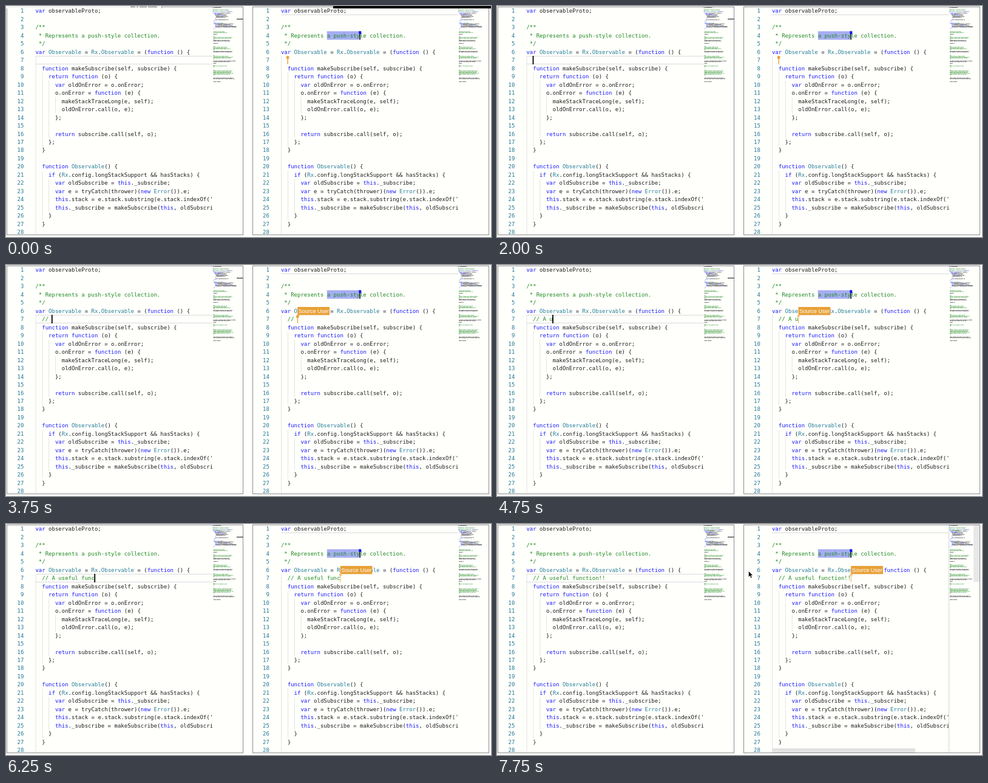
Animation, 799 px wide and 380 px high, one loop 8000 ms. Source, as an HTML page:

```html
<!DOCTYPE html>
<html lang="en">
<head>
<meta charset="utf-8">
<title>Shared code editing</title>
<style>
html, body { margin: 0; width: 100%; height: 100%; overflow: hidden; background: #fffffc; }
svg { display: block; }
text { white-space: pre; font: 9px "DejaVu Sans Mono", monospace; }
.tag { font: 9px "Liberation Sans", Arial, sans-serif; fill: #fff; }
</style>
</head>
<body>
<svg id="stage" width="799" height="380" viewBox="0 0 799 380"></svg>
<script>
const LOOP = 8000, CH = 5.418, LH = 13.48, TOP = 1.5, X0 = 48.4, SHIFT = 404.5;
const MINI_X = 340.5, MINI_CH = 0.7, MINI_LH = 1.35;
const PAPER = '#fffffc', INK = '#1c1c1c', GREEN = '#1f8a1f', BLUE = '#1a1aff', TEAL = '#267f99', ORANGE = '#e8a138';
const NOTE = '// A useful function!!';

const CODE = `var observableProto;

/**
 * Represents a push-style collection.
 */
var Observable = Rx.Observable = (function () {

  function makeSubscribe(self, subscribe) {
    return function (o) {
      var oldOnError = o.onError;
      o.onError = function (e) {
        makeStackTraceLong(e, self);
        oldOnError.call(o, e);
      };

      return subscribe.call(self, o);
    };
  }

  function Observable() {
    if (Rx.config.longStackSupport && hasStacks) {
      var oldSubscribe = this._subscribe;
      var e = tryCatch(thrower)(new Error()).e;
      this.stack = e.stack.substring(e.stack.indexOf('\\n') + 1);
      this._subscribe = makeSubscribe(this, oldSubscribe);
    }
  }
`.split('\n');

// [time, characters typed]
const KEYS = [[3250, 1], [3500, 2], [3750, 3], [4250, 4], [4500, 5], [4750, 6], [5000, 8], [5250, 9],
  [5500, 12], [5750, 13], [6000, 15], [6250, 16], [6500, 19], [6750, 20], [7000, 22]];

// indent guides: [column, first line, last line]
const GUIDES = [[0, 7, 28], [2, 9, 17], [2, 21, 26], [4, 10, 16], [4, 22, 25], [6, 12, 13]];

// rest of the minimap: [top, rows, width, colour]
const BLOCKS = [[42, 2, 28, GREEN], [46, 1, 9, INK], [50, 4, 36, GREEN], [56, 2, 34, INK], [61, 1, 12, INK],
  [66, 5, 30, GREEN], [74, 2, 33, INK], [81, 5, 35, GREEN], [90, 2, 39, INK], [94, 1, 8, INK],
  [97, 3, 26, GREEN], [105, 7, 34, GREEN], [118, 2, 39, INK], [124, 1, 14, INK]];

const svg = document.getElementById('stage');

function add(parent, name, attrs, text) {
  const el = document.createElementNS('http://www.w3.org/2000/svg', name);
  for (const k in attrs) el.setAttribute(k, attrs[k]);
  if (text !== undefined) el.textContent = text;
  parent.appendChild(el);
  return el;
}
const rect = (p, x, y, width, height, fill, more) => add(p, 'rect', { x, y, width, height, fill, ...more });
const show = (el, on) => el.setAttribute('visibility', on ? 'visible' : 'hidden');
const place = (el, x) => el.setAttribute('transform', `translate(${x} 0)`);
const lineTop = n => TOP + (n - 1) * LH;

function tokens(line) {
  if (/^\s*(\/\/|\/\*|\*)/.test(line)) return [[line, GREEN]];
  const parts = line.match(/\w+|\W+/g) || [];
  return parts.map(s => [s,
    /^(var|function|return|if|this|new)$/.test(s) ? BLUE :
    /^(Observable|Rx|Error)$/.test(s) ? TEAL : INK]);
}

function drawLine(g, line, n) {
  const t = add(g, 'text', { x: X0, y: lineTop(n) + 9.8 });
  for (const [s, fill] of tokens(line)) add(t, 'tspan', { fill }, s);
}

const miniBar = (g, x, y, width, fill) => rect(g, MINI_X + x, y, width, 0.9, fill, { opacity: 0.65 });

function drawMini(g, line, n) {
  let col = 0;
  for (const [s, fill] of tokens(line)) {
    for (const w of s.matchAll(/\S+/g)) {
      const x = (col + w.index) * MINI_CH;
      const width = Math.min(w[0].length * MINI_CH, 39 - x);
      if (width > 0) miniBar(g, x, 2 + (n - 1) * MINI_LH, width, fill);
    }
    col += s.length;
  }
}

function drawBlocks(g) {
  let seed = 7;
  const rnd = () => (seed = seed * 16807 % 2147483647) / 2147483647;
  for (const [top, rows, width, fill] of BLOCKS) {
    for (let r = 0; r < rows; r++) {
      const end = rows > 2 && (r === 0 || r === rows - 1) ? 3 : width * (0.7 + 0.3 * rnd());
      let x = 1;
      while (x < end) {
        const w = Math.min(1.5 + rnd() * 5, end - x);
        miniBar(g, x, top + r * MINI_LH, w, fill);
        x += w + 0.7;
      }
    }
  }
}

const defs = add(svg, 'defs', {});
rect(add(defs, 'clipPath', { id: 'code' }), 0, 0, 340.3, 376, '#000');

function editor(shift, activeLine, selected) {
  rect(svg, Math.round(shift) + 1.5, 1.5, 389, 375, PAPER, { stroke: '#8c8c8c' });
  const g = add(svg, 'g', { transform: `translate(${shift} 0)` });
  const body = add(g, 'g', { 'clip-path': 'url(#code)' });
  for (const n of [activeLine, activeLine + 1])
    if (n > 1) rect(body, 48.5, Math.floor(lineTop(n)), 292, 1, '#dadada');
  for (const [col, a, b] of GUIDES)
    rect(body, X0 + col * CH + 0.3, lineTop(a), 0.8, (b - a + 1) * LH, '#dcdcdc');
  if (selected) rect(body, X0 + 14 * CH, 41.5, 10 * CH, 14, '#a6adf2');
  const mini = add(g, 'g', {});
  CODE.forEach((line, i) => {
    add(body, 'text', { x: 29.4, y: lineTop(i + 1) + 9.8, 'text-anchor': 'end', fill: '#237893' }, i + 1);
    drawLine(body, line, i + 1);
    drawMini(mini, line, i + 1);
  });
  drawBlocks(mini);
  return { g, note: add(body, 'g', {}), miniNote: add(mini, 'g', {}) };
}

const left = editor(0, 7, false);
const right = editor(SHIFT, 1, true);

rect(left.g, 380, 21, 10.5, 1, '#111');
const caret = rect(left.g, X0 + 2 * CH - 0.6, 82, 1.8, 14, '#000');

rect(right.g, X0 + 24 * CH - 0.5, lineTop(4), 1.5, LH, '#111');
rect(right.g, X0 + 24 * CH - 1.7, lineTop(4) - 0.5, 4, 4.5, '#1414f0');

const remote = add(right.g, 'g', {});
const px = X0 + 2 * CH;
const pin = add(remote, 'g', {});
rect(pin, px - 0.3, lineTop(7), 1.4, LH, ORANGE);
const knob = rect(pin, px - 1.8, lineTop(7), 4.4, 4.5, ORANGE);
const tag = add(remote, 'g', {});
rect(tag, px + 0.2, 69, 52.8, 13.4, ORANGE);
add(tag, 'text', { class: 'tag', x: px + 1.9, y: 79 }, 'Source User');

const hover = add(svg, 'g', {});
rect(hover, 744, 2, 1, 374, '#d4d4d4');
rect(hover, 785, 2, 10, 93, '#e8e8e8');
rect(hover, 453, 369, 236, 7, '#e2e2e2');
add(hover, 'path', {
  d: 'M414.5 77.5v9.6l2.2-1.9 1.7 3.8 1.7-.8-1.6-3.6 2.9-.2z',
  fill: '#000', stroke: '#fff', 'stroke-width': 0.5
});

// leftover window edge at the very start
const edge = add(svg, 'g', {});
rect(edge, 0, 0, 257, 4, PAPER);
rect(edge, 0, 1, 257, 1, '#e4e4e4');
rect(edge, 256, 0, 1, 4, '#999');
for (const [x, w] of [[205, 8], [215, 3], [220, 12], [234, 15]]) rect(edge, x, 1, w, 1, '#555');
rect(edge, 539, 0, 260, 4, '#000');

let typed = -1;

function typeNote(n) {
  typed = n;
  const line = '  ' + NOTE.slice(0, n);
  for (const { note, miniNote } of [left, right]) {
    note.replaceChildren();
    miniNote.replaceChildren();
    drawLine(note, line, 7);
    drawMini(miniNote, line, 7);
  }
  place(caret, n * CH);
  place(remote, n * CH);
}

function render(t) {
  const n = KEYS.reduce((last, [at, count]) => t >= at ? count : last, 0);
  if (n !== typed) typeNote(n);
  show(caret, (t >= 2000 && t < 2500) || (t >= 3000 && t < 7500));
  show(tag, n > 0);
  pin.setAttribute('opacity', t < 4250 ? 1 : 0.6);
  knob.setAttribute('height', t < 4250 ? 4.5 : 3);
  show(hover, t >= 7750);
  show(edge, t < 250);
}

const start = performance.now();
function tick() {
  render((performance.now() - start) % LOOP);
  requestAnimationFrame(tick);
}
tick();
</script>
</body>
</html>
```
